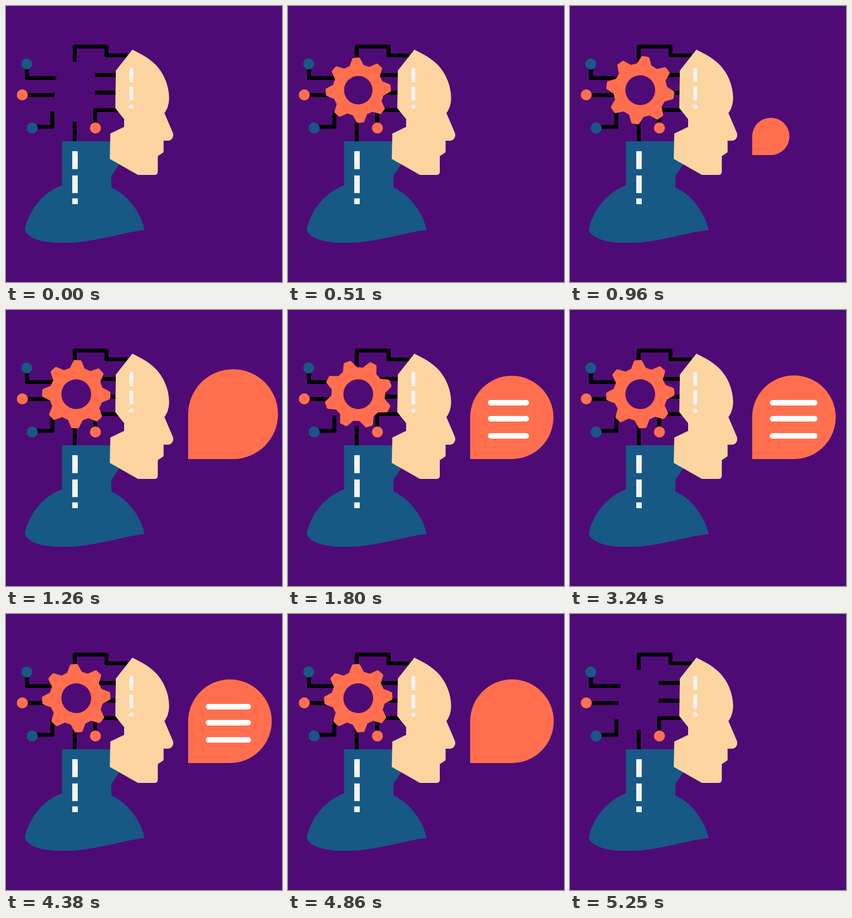
These frames come from a looping animation (500x500 px, 5460 ms). An HTML page:

```html
<!DOCTYPE html>
<html lang="en">
<head>
<meta charset="utf-8">
<title>Thinking head</title>
<style>
  html, body { margin: 0; width: 100%; height: 100%; overflow: hidden; background: #4e0b75; }
  svg { display: block; width: 100%; height: 100%; }
  .wire { fill: none; stroke: #000; stroke-width: 7; stroke-linejoin: round; }
  .blue { fill: #175885; }
  .orange { fill: #ff6f4d; }
  .skin { fill: #fdd5a1; }
  .dash { fill: #f3f3f3; }
  .tooth { stroke: #ff6f4d; stroke-width: 6; stroke-linejoin: round; }
</style>
</head>
<body>
<svg viewBox="0 0 500 500">
  <path class="wire" d="M124.5 101V73.5H182V89.5H220M38 105V130.5H91M30 161.5H88M48 219H84V191
    M124.5 210V247M161 125H202M161 157H202M161.5 221V188.5H206"/>
  <circle class="blue" cx="37.5" cy="105" r="10"/>
  <circle class="orange" cx="29.5" cy="161" r="10"/>
  <circle class="blue" cx="47.5" cy="221" r="10"/>
  <circle class="orange" cx="162" cy="221" r="10"/>

  <path class="blue" d="M101.500 245H200L205 287L191 308V329C220 341 245 375 251 406
    C215 409 160 429 107 429C70 430 38 422 34 405C42 367 70 336 101.500 325Z"/>
  <path class="dash" d="M120 263h10v32.500h-10zM120 307h10v32h-10zM120 348.500h10v10.500h-10z"/>
  <path class="skin" d="M229 79C240 85 254 91 265 101C286 118 296 146 295.500 168
    C295 180 291 189 287 194L302 229C305 236 301 244 293 244H285.500V265L275 272V300Q275 306 269 306
    H239L188 277L189 231L214 219V205L198 185L199 117Z"/>
  <path class="dash" d="M223.500 112.500h7v25.500h-7zM223.500 146h7v25h-7zM223.500 179h7v7h-7z"/>

  <g id="gear">
    <polygon id="teeth" class="orange tooth"/>
    <circle r="27" fill="#4e0b75"/>
  </g>
  <path id="bubble" class="orange" d="M0 0V-75.700A75.700 75.700 0 1 1 75.700 0Z"/>
  <g fill="#fff">
    <rect class="line" x="362" y="163" height="10" rx="5"/>
    <rect class="line" x="362" y="192" height="10" rx="5"/>
    <rect class="line" x="362" y="223" height="10" rx="5"/>
  </g>
</svg>
<script>
const LOOP = 5460;
const gear = document.getElementById('gear');
const bubble = document.getElementById('bubble');
const lines = document.querySelectorAll('.line');

// Eight teeth, each with a wide root and a narrow tip [angle, radius].
const points = [];
for (let i = 0; i < 8; i++)
  for (const [deg, r] of [[-14, 46], [-4.5, 59], [4.5, 59], [14, 46]]) {
    const a = (i * 45 + deg) * Math.PI / 180;
    points.push(`${r * Math.sin(a)},${-r * Math.cos(a)}`);
  }
document.getElementById('teeth').setAttribute('points', points.join(' '));

const progress = (t, start, length) => Math.min(1, Math.max(0, (t - start) / length));
const easeOut = x => 1 - (1 - x) ** 2;
const elastic = (x, period = 0.85) => x <= 0 ? 0 : x >= 1 ? 1
  : 1 + 2 ** (-10 * x) * Math.sin((x - period / 4) * 2 * Math.PI / period);

// One full turn of the gear: [time, degrees].
const turn = [[0, 0], [510, 45], [1260, 141], [1800, 210], [2640, 305.5], [3240, 360]];
function angleAt(t) {
  const i = turn.findIndex(k => k[0] > t);
  if (i < 0) return 360;
  const [t0, a0] = turn[i - 1], [t1, a1] = turn[i];
  return a0 + (a1 - a0) * (t - t0) / (t1 - t0);
}

function draw(now) {
  const t = now % LOOP;
  const leave = 1 - easeOut(progress(t, 4888, 360));
  const gearSize = easeOut(progress(t, 0, 650)) * leave;
  const bubbleSize = elastic(progress(t, 874, 1300)) * leave;
  const lineSize = easeOut(progress(t, 1480, 510)) * (1 - easeOut(progress(t, 4367, 500)));
  gear.setAttribute('transform', `translate(127.3 152.500) rotate(${angleAt(t) - 4}) scale(${gearSize})`);
  bubble.setAttribute('transform', `translate(330 270) scale(${bubbleSize})`);
  for (const line of lines) line.setAttribute('width', 86.5 * lineSize);
}

const begin = performance.now();
function frame() {
  draw(performance.now() - begin);
  requestAnimationFrame(frame);
}
draw(0);
requestAnimationFrame(frame);
</script>
</body>
</html>
```
